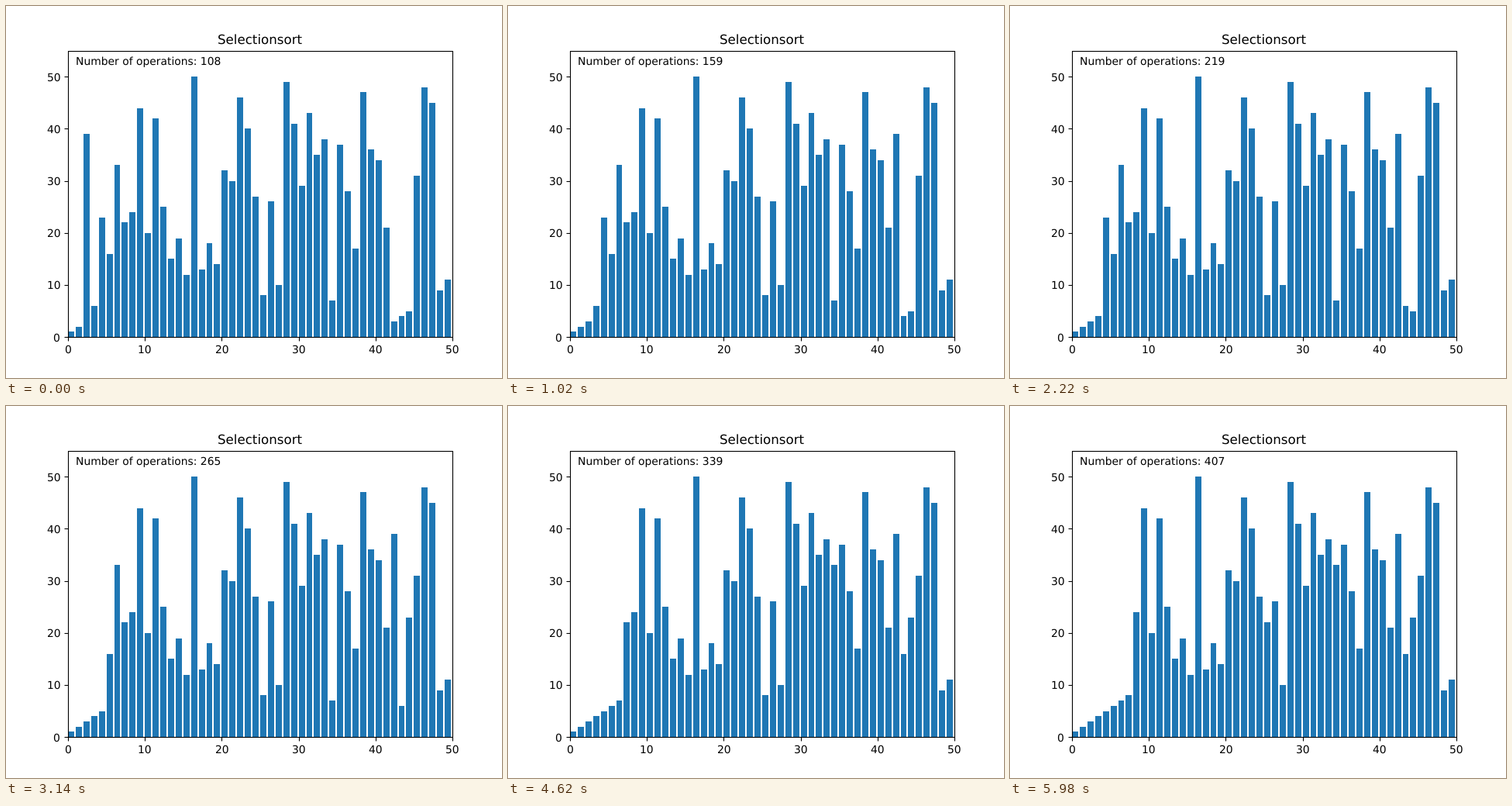
These frames come from a looping animation (640x480 px, 6000 ms). An HTML page with a canvas:

```html
<!DOCTYPE html>
<html lang="en">
<head>
<meta charset="utf-8">
<title>Selectionsort</title>
<style>
  html, body { margin: 0; width: 100%; height: 100%; overflow: hidden; background: #fff; }
  canvas { display: block; }
</style>
</head>
<body>
<canvas id="stage" width="640" height="480"></canvas>
<script>
const ctx = document.getElementById('stage').getContext('2d');
const LOOP = 6000, STEP = 20, FIRST_OP = 108;
const LEFT = 80, RIGHT = 576, TOP = 57.6, BOTTOM = 427.2;
const START = [
  1, 2, 39, 6, 23, 16, 33, 22, 24, 44, 20, 42, 25, 15, 19, 12, 50, 13, 18, 14,
  32, 30, 46, 40, 27, 8, 26, 10, 49, 41, 29, 43, 35, 38, 7, 37, 28, 17, 47, 36,
  34, 21, 3, 4, 5, 31, 48, 45, 9, 11
];

const px = v => LEFT + v * (RIGHT - LEFT) / 50;
const py = v => BOTTOM - v * (BOTTOM - TOP) / 55;

// Each pass scans the unsorted part, then spends one more operation on the swap.
function sortedUpTo(op) {
  const a = START.slice();
  const n = a.length;
  for (let i = 0, end = n + 1; i < n && end <= op; i++, end += n + 1 - i) {
    const min = a.indexOf(Math.min(...a.slice(i)));
    [a[i], a[min]] = [a[min], a[i]];
  }
  return a;
}

// align: 0 = left, 0.5 = centre, 1 = right
function label(text, x, y, align = 0, size = 13.8889) {
  ctx.font = `${size}px "DejaVu Sans", sans-serif`;
  ctx.textRendering = 'geometricPrecision';
  const left = x - ctx.measureText(text).width * align;
  ctx.fillText(text, Math.round(left), Math.round(y));
}

function line(x1, y1, x2, y2) {
  ctx.beginPath();
  ctx.moveTo(x1, y1);
  ctx.lineTo(x2, y2);
  ctx.stroke();
}

function drawBars(values) {
  ctx.fillStyle = '#1f77b4';
  const base = Math.round(BOTTOM);
  values.forEach((v, i) => {
    const x = Math.round(px(i)), y = Math.round(py(v));
    ctx.fillRect(x, y, Math.round(px(i + 0.8)) - x, base - y);
  });
}

function drawAxes() {
  ctx.fillStyle = ctx.strokeStyle = '#000';
  ctx.lineWidth = 1.111;
  for (let v = 0; v <= 50; v += 10) {
    const x = Math.round(px(v)) + 0.5, y = Math.round(py(v)) + 0.5;
    line(x, 427.5, x, 432.5);
    line(75.5, y, 80.5, y);
    label(String(v), px(v), 448, 0.5);
    label(String(v), 70.28, py(v) + 5.45, 1);
  }
  ctx.strokeRect(80.5, 58.5, 496, 369);
  label('Selectionsort', 328, 49, 0.5, 16.6667);
}

function draw(ms) {
  const op = FIRST_OP + Math.floor(ms % LOOP / STEP);
  ctx.fillStyle = '#fff';
  ctx.fillRect(0, 0, 640, 480);
  drawBars(sortedUpTo(op));
  drawAxes();
  label('Number of operations: ' + op, 89.92, 76);
}

const begin = performance.now();
function tick() {
  draw(performance.now() - begin);
  requestAnimationFrame(tick);
}
tick();
</script>
</body>
</html>
```
